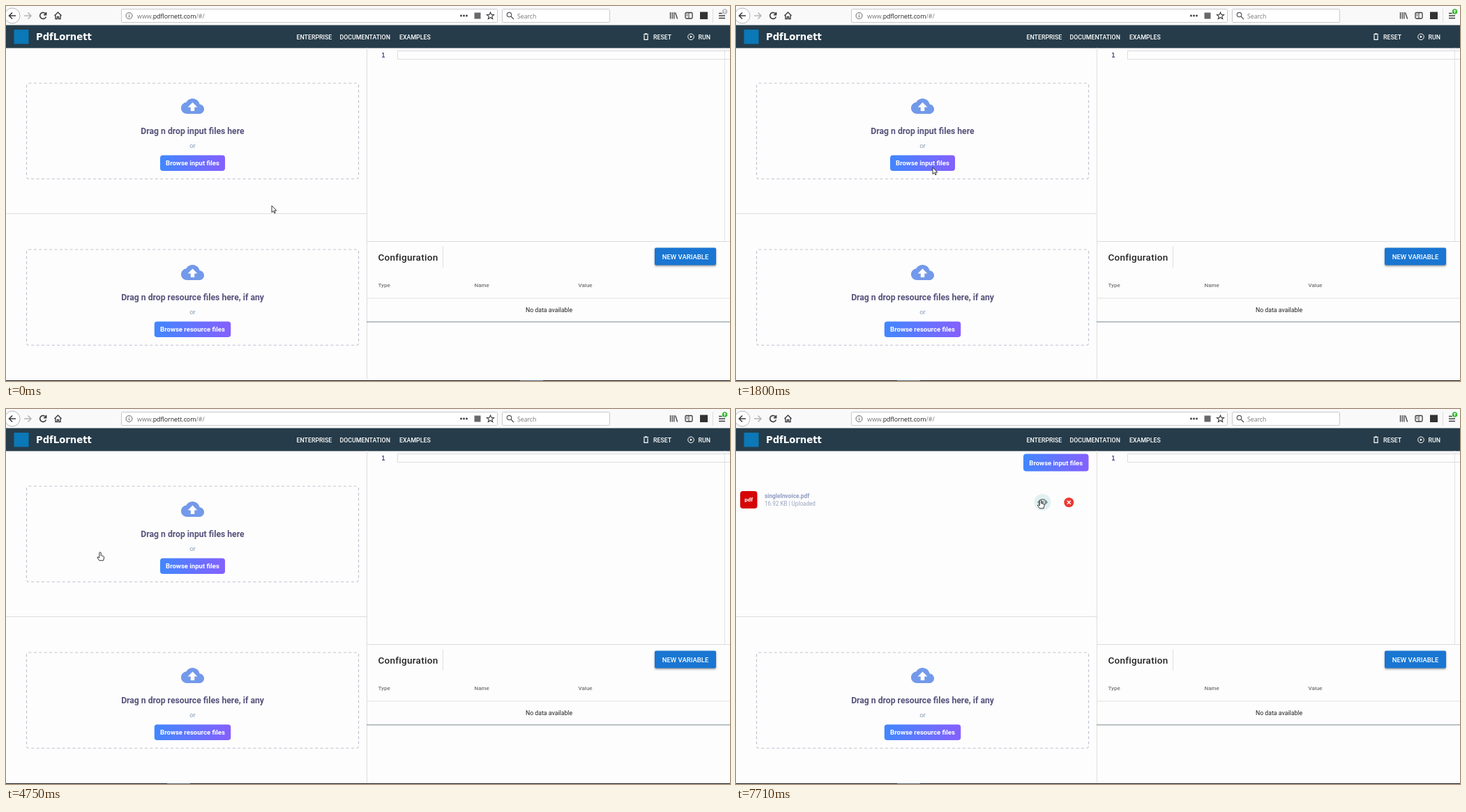
These frames come from a looping animation (1038x539 px, 8000 ms). An HTML page with a canvas:

```html
<!DOCTYPE html>
<html lang="en">
<head>
<meta charset="utf-8">
<title>Upload demo</title>
<style>
html, body { margin: 0; width: 100%; height: 100%; overflow: hidden; background: #fdfdfd; }
canvas { display: block; }
</style>
</head>
<body>
<canvas id="stage" width="1038" height="539"></canvas>
<script>
const ctx = document.getElementById('stage').getContext('2d');
const LOOP = 8000;
const PAGE = 'Roboto, sans-serif';
const SYSTEM = '"Open Sans", sans-serif';
const INK = '#3c3c40';

// Each step holds until the next one begins.
const STEPS = [
  { at: 0, cursor: [381, 287] },
  { at: 1000, cursor: [369, 283] },
  { at: 1800, cursor: [282, 232] },
  { at: 2790, cursor: [282, 232], dialog: 'blank' },
  { at: 3770, cursor: [142.5, 188], dialog: 'files' },
  { at: 4750, cursor: [135, 206], hand: true },
  { at: 5730, cursor: [135, 205], uploaded: true },
  { at: 6720, cursor: [424, 140], uploaded: true },
  { at: 7710, cursor: [436.5, 131], hand: true, uploaded: true, hover: true },
];

const FILES = [
  ['77215306-TXF-1840K-2007', '4/6/2019 11:35 AM', '12'],
  ['attachment', '4/7/2019 3:08 PM', '3'],
  ['Credit Notes', '4/6/2019 11:31 AM', '3,466'],
  ['multipleInvoices', '4/15/2019 12:32 A...', '52'],
  ['multipleInvoices2', '4/6/2019 11:31 AM', '457'],
  ['multipleInvoices3', '4/15/2019 12:35 A...', '497'],
  ['multipleInvoices4', '4/15/2019 12:37 A...', '338'],
  ['pdfWithPassword', '1/20/2019 12:08 A...', '52'],
  ['policy', '4/15/2019 1:31 AM', '494'],
  ['singleInvoice', '4/15/2019 12:28 A...', '17'],
  ['singleInvoiceWithAnnotation', '4/18/2019 7:23 PM', '23'],
  ['singleInvoiceWithLogo', '4/18/2019 10:14 PM', '20'],
];

const CLOUD = 'M19.35 10.04C18.67 6.59 15.64 4 12 4 9.11 4 6.6 5.64 5.35 8.04 2.34 8.36 0 10.91 0 14' +
  'c0 3.31 2.69 6 6 6h13c2.76 0 5-2.24 5-5 0-2.64-2.05-4.78-4.65-4.96zM14 13v4h-4v-4H7l5-5 5 5h-3z';
const ARROW = 'M0 0V9.6L2.3 7.6 3.8 10.8 5.2 10.2 3.8 7H6.8Z';
const HAND = 'M-1.2.5Q0-1 1.2.5V4.6L4.4 5.4Q5.8 5.8 5.5 8L4.6 11.8H-1.2L-3.9 8Q-4.2 6.6-3 6.6L-1.2 8Z';

function box(x, y, w, h, { fill, stroke, r = 0, width = 1 }) {
  ctx.beginPath();
  ctx.roundRect(x, y, w, h, r);
  if (fill) { ctx.fillStyle = fill; ctx.fill(); }
  if (stroke) { ctx.strokeStyle = stroke; ctx.lineWidth = width; ctx.stroke(); }
}

function circle(x, y, r, style) {
  box(x - r, y - r, 2 * r, 2 * r, { ...style, r });
}

function path(d, x, y, { fill, stroke, width = 1, scale = 1 }) {
  const shape = new Path2D(d);
  ctx.save();
  ctx.translate(x, y);
  ctx.scale(scale, scale);
  if (fill) { ctx.fillStyle = fill; ctx.fill(shape); }
  if (stroke) { ctx.strokeStyle = stroke; ctx.lineWidth = width; ctx.stroke(shape); }
  ctx.restore();
}

// The y value is the middle of the capital letters.
function text(s, x, y, size, color, { weight = 400, font = PAGE, align = 'left', spacing = 0 } = {}) {
  ctx.font = `${weight} ${size}px ${font}`;
  ctx.textAlign = align;
  ctx.letterSpacing = spacing + 'px';
  ctx.fillStyle = color;
  ctx.fillText(s, x, y + size * 0.36);
}

const systemText = (s, x, y, color = '#222', align, size = 7.85) =>
  text(s, x, y, size, color, { font: SYSTEM, align });
const hline = (x, y, w, color) => box(x, y, w, 1, { fill: color });
const vline = (x, y, h, color) => box(x, y, 1, h, { fill: color });
const chevron = (x, y, dir = 1, color = '#444') =>
  path(`M-2.5 ${-1.2 * dir}L0 ${1.3 * dir} 2.5 ${-1.2 * dir}`, x, y, { stroke: color });

function browserBar(first) {
  box(0, 0, 1038, 28, { fill: '#f9f9fa' });
  circle(9, 14, 11, { fill: '#fff', stroke: '#b8b8bc' });
  path('M14 14H4.5M9 9.5L4.5 14 9 18.5', 0, 0, { stroke: INK, width: 1.6 });
  path('M26 14H35.5M31.5 9.5L36 14 31.5 18.5', 0, 0, { stroke: '#b5b5b8', width: 1.5 });
  path('M57 11.5A4.5 4.5 0 1 0 57.4 15.5M57.6 9V12.6H54', 0, 0, { stroke: INK, width: 1.6 });
  path('M69.5 14L74.5 9 79.5 14M71 13.5V18.5H73.5V15.5H75.5V18.5H78V13.5', 0, 0, { stroke: INK, width: 1.4 });

  box(165.5, 4.5, 539, 19, { fill: '#fff', stroke: '#cacace', r: 1 });
  circle(176.5, 14, 4.5, { stroke: '#66666a' });
  path('M176.5 13.2V16.6M176.5 11.2V12.2', 0, 0, { stroke: '#66666a' });
  const url = { font: SYSTEM };
  text('www.', 188, 14.5, 8.85, '#77777b', url);
  let x = 188 + ctx.measureText('www.').width;
  text('pdflornett.com', x, 14.5, 8.85, '#1c1c20', url);
  x += ctx.measureText('pdflornett.com').width;
  text('/#/', x, 14.5, 8.85, '#77777b', url);
  for (const dot of [652.5, 656.5, 660.5]) circle(dot, 14, 1.4, { fill: INK });
  box(671.5, 9.5, 9, 9, { fill: '#68686c' });
  path('M0-5L1.5-1.6 5.1-1.4 2.3.9 3.2 4.5 0 2.5-3.2 4.5-2.3.9-5.1-1.4-1.5-1.6Z', 694.5, 14, { stroke: INK, width: 1.1 });

  box(711.5, 4.5, 154, 19, { fill: '#fff', stroke: '#cacace', r: 1 });
  circle(721.5, 12.5, 3.2, { stroke: '#55555a', width: 1.2 });
  path('M724 15L728 19', 0, 0, { stroke: '#55555a', width: 1.3 });
  systemText('Search', 733, 14.5, '#77777b', 'left', 8.7);

  path('M952.5 9V18.5M955.2 9V18.5M957.8 9V18.5M959.6 9.5L962.6 18.5', 0, 0, { stroke: INK, width: 1.3 });
  box(974, 9.5, 10, 8.5, { stroke: INK, r: 1.5, width: 1.3 });
  path('M979 10V18M975.5 12H977.5M975.5 14H977.5', 0, 0, { stroke: INK });
  box(995, 8.5, 11, 10.5, { fill: '#333' });
  vline(1013, 4, 20, '#dedee0');
  path('M1022 10.5H1031M1022 14H1031M1022 17.5H1031', 0, 0, { stroke: INK, width: 1.4 });
  circle(1030.5, 8, 4.3, { fill: first ? '#b9b9bc' : '#35b52a', stroke: '#f9f9fa' });
  path('M1030.5 10.5V6M1028.6 7.8L1030.5 5.8 1032.4 7.8', 0, 0, { stroke: '#fff' });
}

function navBar() {
  box(0, 27.5, 1038, 33, { fill: '#263c4a' });
  box(11.5, 34, 21, 20.5, { fill: '#0b78b7' });
  text('PdfLornett', 43, 44.5, 13.2, '#fff', { weight: 700, font: '"DejaVu Sans", sans-serif' });
  const item = (s, x) => text(s, x, 44.5, 8.8, '#fff', { weight: 500 });
  item('ENTERPRISE', 416.5);
  item('DOCUMENTATION', 478.5);
  item('EXAMPLES', 564);
  item('RESET', 928);
  item('RUN', 992.5);
  path('M914 40.7H921M916 39.8H919M915 42V48.3H920V42', 0, 0, { stroke: '#fff', width: 1.2 });
  circle(982, 44.3, 4.3, { stroke: '#fff' });
  path('M980.8 42.3V46.3L984 44.3Z', 0, 0, { fill: '#fff' });
}

function browseButton(label, x, y, w, h) {
  const fill = ctx.createLinearGradient(x, 0, x + w, 0);
  fill.addColorStop(0, '#4187ff');
  fill.addColorStop(1, '#8560ff');
  box(x, y, w, h, { fill, r: 4 });
  text(label, x + w / 2, y + h / 2 + 0.2, 9.55, '#fff', { weight: 700, align: 'center' });
}

function dropZone(y, title, label, buttonWidth) {
  ctx.setLineDash([4, 3.4]);
  box(29.5, y + 0.5, 476, 137.5, { stroke: '#c0c4d0', r: 3, width: 1.2 });
  ctx.setLineDash([]);
  path(CLOUD, 251, y + 17, { fill: '#7399ea', scale: 1.375 });
  text(title, 267.5, y + 69.3, 12.2, '#56527c', { weight: 700, align: 'center' });
  text('or', 267.5, y + 90.5, 9.6, '#8aa0b8', { align: 'center' });
  browseButton(label, 267.5 - buttonWidth / 2, y + 104, buttonWidth, 22.5);
}

function uploadedFile(hover) {
  browseButton('Browse input files', 412, 64.5, 93.5, 25);
  box(6, 118, 24.5, 25, { fill: '#d50407', r: 4 });
  text('pdf', 18.3, 130.5, 8, '#fff', { weight: 700, align: 'center' });
  text('singleInvoice.pdf', 41, 125, 8.3, '#8f9cc0', { weight: 700 });
  text('16.92 KB | Uploaded', 41, 136, 8.15, '#97a3bd');
  if (hover) circle(439.5, 134, 12, { fill: '#e2f0f1' });
  path('M-7.5 0Q0-10 7.5 0Q0 10-7.5 0Z', 439.5, 134, { fill: '#7c8f90' });
  circle(439.5, 134, 3.3, { fill: '#eef4f4' });
  circle(439.5, 134, 2, { fill: '#7c8f90' });
  circle(477.3, 134.2, 7, { fill: '#ea3a33' });
  path('M-2.5-2.5L2.5 2.5M2.5-2.5L-2.5 2.5', 477.3, 134.2, { stroke: '#fff', width: 1.4 });
}

function editorAndTable() {
  text('1', 541, 70.8, 8.8, '#4a4780', { weight: 700, font: '"DejaVu Sans Mono", monospace', align: 'center' });
  box(561.5, 64.5, 490, 12, { stroke: '#dcdcdf' });
  vline(1030, 60, 278, '#e3e3e5');
  hline(517, 338, 521, '#dadadc');
  text('Configuration', 533.5, 361, 13.5, '#222', { weight: 500, spacing: 0.27 });
  vline(626, 345, 31, '#e0e0e2');
  ctx.save();
  ctx.shadowColor = 'rgba(0,0,0,.4)';
  ctx.shadowBlur = 3;
  ctx.shadowOffsetY = 1.5;
  box(930, 347.5, 88, 25, { fill: '#1976d2', r: 2 });
  ctx.restore();
  text('NEW VARIABLE', 974, 360.2, 9.5, '#fff', { weight: 500, align: 'center' });
  const head = (s, x) => text(s, x, 401.5, 8, '#757578', { weight: 500 });
  head('Type', 533.5);
  head('Name', 671.5);
  head('Value', 820.5);
  hline(517, 419.5, 521, '#e2e2e4');
  text('No data available', 778.5, 437, 8.75, '#222', { align: 'center' });
  hline(517, 453.5, 521, '#778a8c');
}

function page({ at, uploaded, hover }) {
  box(0, 0, 1038, 539, { fill: '#fdfdfd' });
  browserBar(at < 1800);
  navBar();
  if (uploaded) uploadedFile(hover);
  else dropZone(110.5, 'Drag n drop input files here', 'Browse input files', 93);
  hline(0, 298, 517, '#dedee0');
  dropZone(349.5, 'Drag n drop resource files here, if any', 'Browse resource files', 109.5);
  vline(517, 60, 478, '#dedee0');
  editorAndTable();
  hline(0, 538, 1038, '#15171c');
  hline(at < 1800 ? 737 : 231, 538, 33, '#5b6672');
}

function dialogTop() {
  path('M18 10H9.5M13 6.8L9.5 10 13 13.2M29 10H37.5M34 6.8L37.5 10 34 13.2', 0, 0, { stroke: '#c9c9cc' });
  chevron(50, 10, 1, '#c9c9cc');
  path('M64 14.5V6.5M60.5 10L64 6.5 67.5 10', 0, 0, { stroke: '#555', width: 1.2 });
  box(73.5, 2.5, 290, 14.5, { fill: '#fff', stroke: '#d9d9d9' });
  box(76.5, 5.5, 6.5, 8.5, { fill: '#f5cf66' });
  const crumbs = [['«', 88.5], ['New Volume (D:)', 98.5], ['git', 174], ['pdflornett', 199], ['sample', 250]];
  for (const [name, x] of crumbs) systemText(name, x, 10);
  for (const x of [168, 193, 244]) path('M-1.2-2.3L1.2 0-1.2 2.3', x, 10, { stroke: '#555' });
  chevron(342, 10.5);
  path('M358 8A3.6 3.6 0 1 1 355 6.5M355 4.5L357.5 6.5 355 8.5', 0, 0, { stroke: '#555' });
  box(368.5, 2.5, 136.5, 14.5, { fill: '#fff', stroke: '#d9d9d9' });
  systemText('Search sample', 374, 10, '#77777a', 'left', 7.7);
  circle(497, 9, 2.5, { stroke: '#555' });
  path('M495.2 11L492.3 13.8', 0, 0, { stroke: '#555', width: 1.2 });

  box(0, 22.5, 512, 20.5, { fill: '#f6f7f8' });
  hline(0, 42.5, 512, '#e9e9eb');
  systemText('Organize', 12, 33, '#2a3550', 'left', 8);
  systemText('New folder', 72, 33, '#2a3550');
  for (const x of [49.5, 449]) path('M-2.5-1.2H2.5L0 1.6Z', x, 33, { fill: '#333' });
  path('M430 30H432M434 30H440M430 33H432M434 33H440M430 36H432M434 36H440', 0, 0, { stroke: '#77777c' });
  box(467, 29.5, 9.5, 7, { fill: '#fff', stroke: '#5d83ae' });
  box(472, 29.5, 4.5, 7, { fill: '#6ea3d8' });
  circle(496.5, 33, 5.5, { fill: '#0a63b8' });
  text('?', 496.5, 33, 8, '#fff', { weight: 700, align: 'center' });
}

function dialogFiles() {
  for (const y of [51, 68, 128, 145, 160, 176, 193, 209]) box(23.5, y - 4, 3.5, 8, { fill: '#f3cf70' });
  box(18.5, 85.5, 7.5, 9, { fill: '#2e86c9' });
  path('M20 108H27V114H20ZM18 116H26', 0, 0, { fill: '#54a9df', stroke: '#8d9ba8' });
  box(22, 222, 5, 6, { fill: '#3388c5' });
  box(0, 234, 27, 10.5, { fill: '#cdcdcd' });

  const heads = [['Name', 52], ['Date modified', 230], ['Type', 311], ['Size', 393]];
  for (const [name, x] of heads) systemText(name, x, 52.5, '#4f5b78');
  for (const x of [225, 307, 388, 442]) vline(x, 43, 18, '#e6e6e8');
  chevron(137, 45, -1, '#888');

  box(51, 183.5, 391.5, 14.5, { fill: '#e5f3fe' });
  FILES.forEach(([name, date, size], i) => {
    const y = 73 + 14.72 * i;
    box(55, y - 4.5, 8, 9, { fill: '#e2625a' });
    systemText(name, 67, y);
    systemText(date, 229.5, y, '#6d6d70');
    systemText('Velda Quorant D...', 311, y, '#6d6d70');
    systemText(size + ' KB', 438, y, '#6d6d70', 'right');
  });
  box(55, 243, 8, 1.5, { fill: '#e2625a' });
}

function dialogBottom() {
  systemText('File name:', 117, 261.5, '#222', 'right');
  box(120.5, 253.5, 245, 15.5, { fill: '#fff', stroke: '#3b8fd6' });
  chevron(360, 261.5);
  box(373.5, 253.5, 128, 15.5, { fill: '#e4e4e4', stroke: '#b0b0b0' });
  systemText('*.pdf', 376, 261.5);
  chevron(495.5, 261.5);
  box(374.5, 273.7, 58, 16, { fill: '#e1e1e1', stroke: '#1c7fd4', width: 1.5 });
  systemText('Open', 403.5, 282, '#222', 'center');
  box(442.5, 273.5, 58.5, 16.5, { fill: '#e1e1e1', stroke: '#b0b0b0' });
  systemText('Cancel', 471.5, 282, '#222', 'center');
  path('M506 298L511 293M509 298L511 296', 0, 0, { stroke: '#aaa' });
}

function dialog(kind) {
  ctx.save();
  ctx.shadowColor = 'rgba(0,0,0,.35)';
  ctx.shadowBlur = 8;
  ctx.shadowOffsetY = 3;
  box(-10, -10, 523, 309.5, { fill: '#fdfdfd' });
  ctx.restore();
  if (kind === 'files') {
    dialogTop();
    dialogFiles();
    dialogBottom();
    chevron(506.5, 49, -1);
    chevron(506.5, 239);
  }
  box(502, 55, 9.5, 155, { fill: '#cbcbcb' });
  box(27, 147, 10.5, 74, { fill: '#cbcbcb' });
  chevron(32, 49, -1);
  chevron(32, 239);
  hline(0, 298.7, 513, '#8f9399');
  vline(512.3, 0, 299, '#4a9add');
}

function frame(now) {
  const time = now % LOOP;
  const step = STEPS.findLast(s => s.at <= time);
  page(step);
  if (step.dialog) dialog(step.dialog);
  path(step.hand ? HAND : ARROW, ...step.cursor, { fill: '#fff', stroke: '#222', width: 0.9 });
  requestAnimationFrame(frame);
}
requestAnimationFrame(frame);
</script>
</body>
</html>
```
